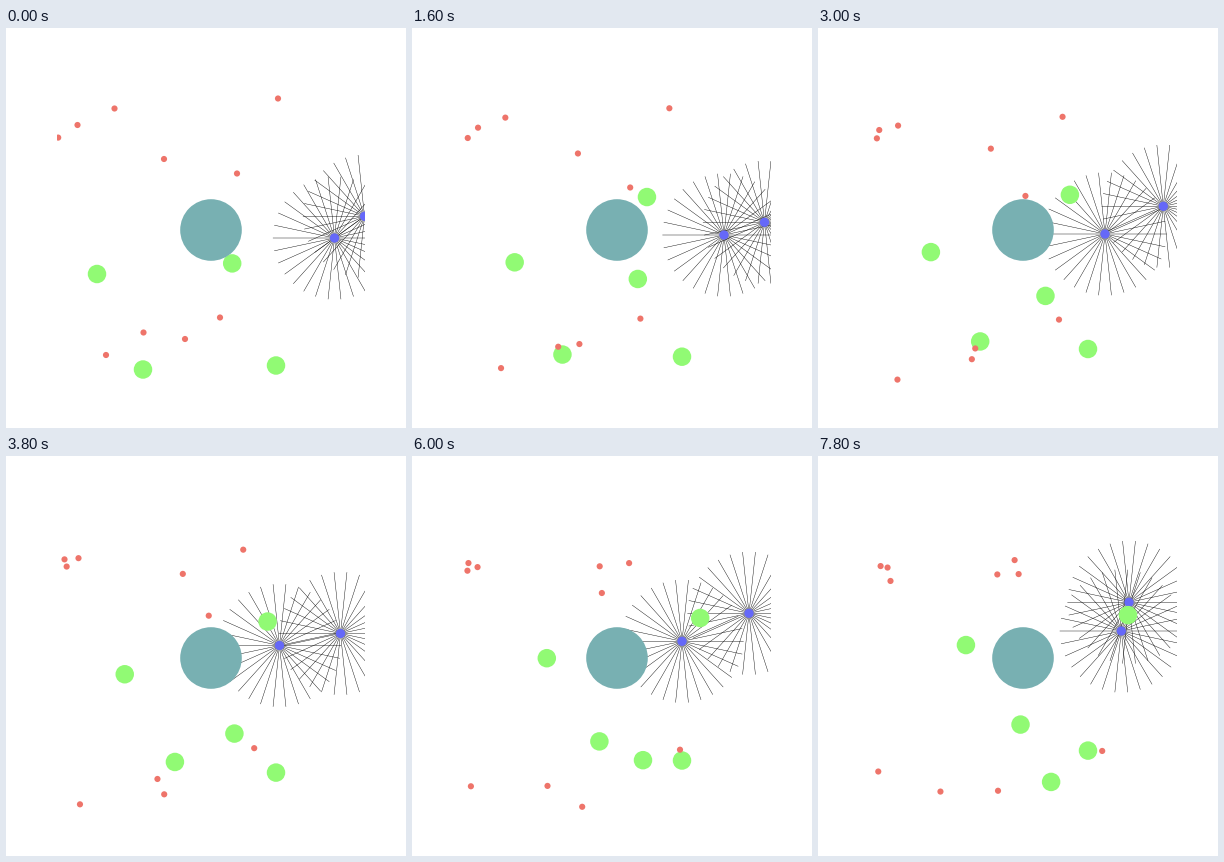
Recreate the animation shown at these times as a matplotlib script. Size 400x400 px, loop 8000 ms.

```python
import numpy as np
import matplotlib.pyplot as plt
from matplotlib.animation import FuncAnimation
from matplotlib.collections import LineCollection
from matplotlib.patches import Circle, Rectangle

FRAMES, STEP = 40, 200
SIDE = 308
LOW = np.array([51, 48])
HIGH = LOW + SIDE
CENTER = LOW + SIDE / 2
SENSOR = 0.2 * SIDE
R_ROCK, R_FOOD, R_POISON, R_HUNTER = np.array([0.1, 0.03, 0.01, 0.015]) * SIDE
BLUE, GREEN, RED, TEAL = [
    tuple(c / 255 for c in rgb)
    for rgb in ((101, 104, 249), (145, 250, 116), (238, 116, 106), (120, 176, 178))
]

# Start position, velocity per frame and, if late, the frame of appearance.
FOOD = [
    (91, 246, 1.46, -1.46),
    (137, 341.5, 1.68, -1.87),
    (270, 337.5, 0, -1.1),
    (226.2, 235.4, -2.02, -1.35),
    (215.6, 171.6, 2.42, -0.32, 5),
]
POISON = [
    (272, 70.5, -1.83, 1.22),
    (231, 145.5, -1.6, 1.75),
    (158, 131, 0.99, -0.69),
    (108.5, 80.5, -1.895, 1.14),
    (71.5, 97, -0.684, 0.335),
    (52.2, 109.6, 0.445, 0.05),
    (137.5, 304.5, 1.09, 1.78),
    (100, 327, -1.37, 1.64),
    (179, 311, -1.45, 0.63),
    (214, 289.5, 1.8, 0.14),
]
# The hunters steer, so they follow a smooth curve through waypoints.
KEYS = np.array([0, 8, 15, 19, 25, 30, 39])
HUNTERS = [
    [(328.5, 210), (312, 207), (287, 206), (273.5, 189.5),
     (263.3, 182.3), (270, 185.3), (303.3, 175)],
    [(358.5, 188.3), (352.5, 194.3), (345.3, 178.3), (334.5, 177.5),
     (333, 165.7), (337, 157.3), (311, 146.3)],
]


def drift(start, radius):
    """Straight motion that rebounds from the walls and the central rock."""
    pos, vel = np.array(start[:2], float), np.array(start[2:4], float)
    track = [pos]
    for _ in range(FRAMES - 1):
        pos = pos + vel
        vel = np.where(pos < LOW + radius, abs(vel), vel)
        vel = np.where(pos > HIGH - radius, -abs(vel), vel)
        gap = pos - CENTER
        dist = np.hypot(*gap)
        normal = gap / dist
        if dist < R_ROCK + radius and vel @ normal < 0:
            vel = vel - 2 * (vel @ normal) * normal
        track.append(pos)
    return track


def steer(points):
    """Cubic Hermite curve through the waypoints."""
    pos = np.array(points, float)
    slope = np.gradient(pos, KEYS, axis=0)
    track = []
    for n in range(FRAMES):
        i = min(np.searchsorted(KEYS, n, side="right") - 1, len(KEYS) - 2)
        h = KEYS[i + 1] - KEYS[i]
        u = (n - KEYS[i]) / h
        track.append((1 + 2 * u) * (1 - u) ** 2 * pos[i]
                     + u * (1 - u) ** 2 * h * slope[i]
                     + u * u * (3 - 2 * u) * pos[i + 1]
                     + u * u * (u - 1) * h * slope[i + 1])
    return track


fig = plt.figure(figsize=(4, 4), dpi=100, facecolor="white")
ax = fig.add_axes([0, 0, 1, 1])
ax.set(xlim=(0, 400), ylim=(400, 0))
ax.axis("off")
arena = Rectangle(LOW, SIDE, SIDE, transform=ax.transData)


def disc(radius, color, z, center=(0, 0)):
    patch = ax.add_patch(Circle(center, radius, fc=color, lw=0, zorder=z))
    patch.set_clip_path(arena)
    return patch


def sensor_fan():
    fan = LineCollection([], colors="black", linewidths=0.3, zorder=1)
    fan.set_snap(False)
    ax.add_collection(fan, autolim=False)
    fan.set_clip_path(arena)
    return fan


angles = np.arange(30) * 2 * np.pi / 30
rays = SENSOR * np.column_stack([np.cos(angles), np.sin(angles)])

hunters = [(steer(p), disc(R_HUNTER, BLUE, 2), sensor_fan()) for p in HUNTERS]
drifters = [
    (drift(start, radius), disc(radius, color, z), start[4] if len(start) > 4 else 0)
    for group, radius, color, z in ((FOOD, R_FOOD, GREEN, 3),
                                    (POISON, R_POISON, RED, 4))
    for start in group
]
disc(R_ROCK, TEAL, 5, CENTER)


def draw(n):
    for track, body, fan in hunters:
        center = track[n]
        body.center = tuple(center)
        fan.set_segments([(center, center + ray) for ray in rays])
    for track, body, birth in drifters:
        body.center = tuple(track[n])
        body.set_visible(n >= birth)
    return ax.patches + ax.collections[:]


anim = FuncAnimation(fig, draw, frames=FRAMES, interval=STEP,
                     init_func=lambda: draw(0), repeat=True, repeat_delay=0)
plt.show()
```
